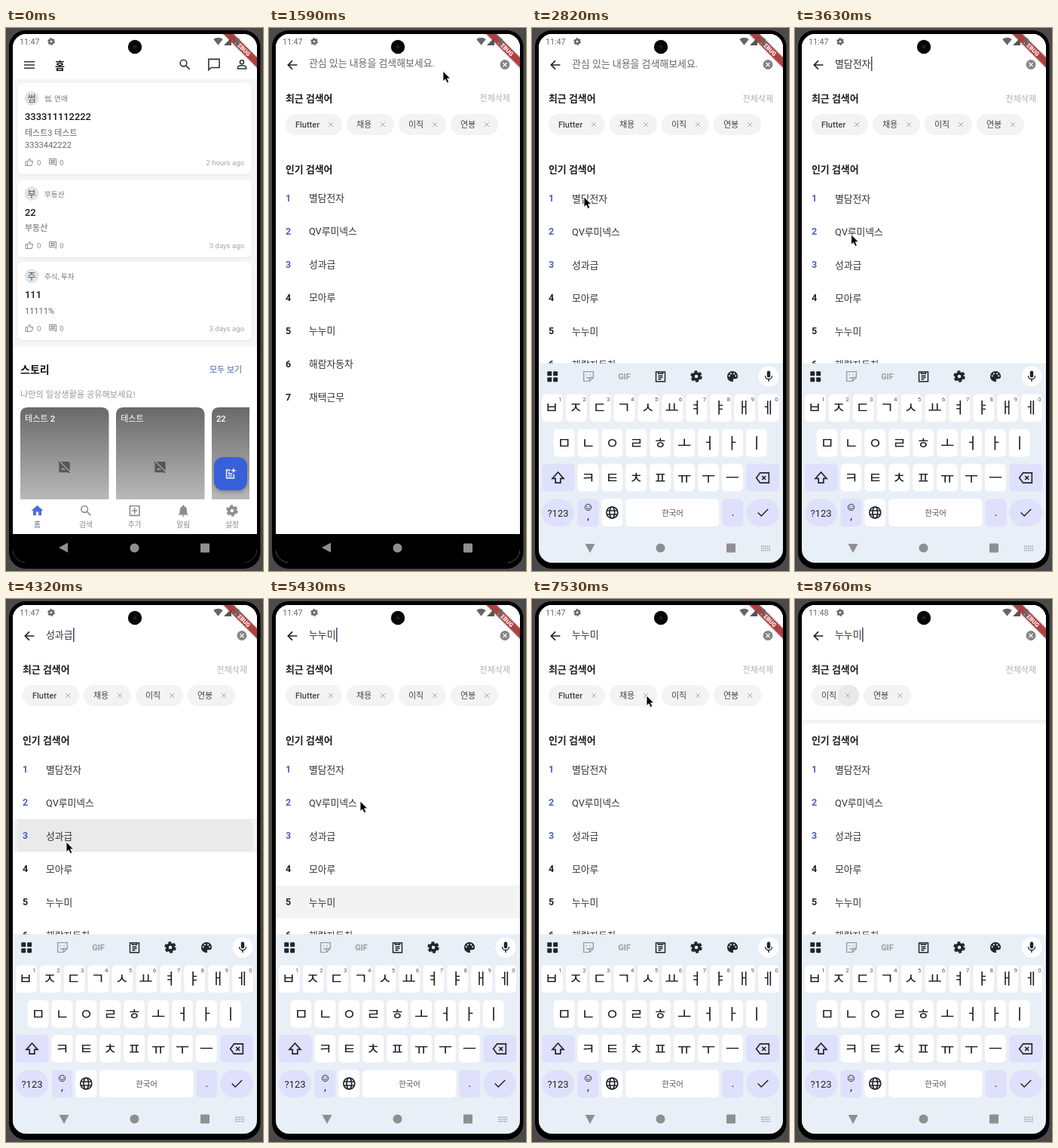
Write an HTML page that moves like this. It is 341 px wide and 720 px high and loops after 9.21 s.

```html
<!DOCTYPE html>
<html lang="ko">
<head>
<meta charset="utf-8">
<title>Search demo</title>
<style>
html, body { margin: 0; width: 100%; height: 100%; overflow: hidden; background: #4a4a4a; }
svg { display: block; font-family: Roboto, "Noto Sans CJK KR", "Noto Sans CJK", sans-serif; }
text { white-space: pre; }
</style>
</head>
<body>
<svg id="stage" width="341" height="720" viewBox="0 0 341 720"></svg>
<script>
const LOOP = 9210;
const $ = id => document.getElementById(id);
const clamp = v => Math.max(0, Math.min(1, v));
const smooth = p => p * p * (3 - 2 * p);

// Icons on a 24 unit grid: filled shapes and outlines.
const path = d => `<path d="${d}"/>`;
const FILLED = {
  home: path('M10 20v-6h4v6h5v-8h3L12 3 2 12h3v8z'),
  bell: path('M12 22a2 2 0 0 0 2-2h-4a2 2 0 0 0 2 2zm6-6v-5c0-3-1.6-5.6-4.5-6.3V4a1.5 1.5 0 0 0-3 0v.7C7.6 5.4 6 8 6 11v5l-2 2v1h16v-1z'),
  mic: path('M12 14a3 3 0 0 0 3-3V5a3 3 0 0 0-6 0v6a3 3 0 0 0 3 3zm5-3a5 5 0 0 1-10 0H5c0 3.4 2.7 6.2 6 6.7V21h2v-3.3c3.3-.5 6-3.3 6-6.7z'),
  palette: path('M12 2a10 10 0 0 0 0 20c1.7 0 2-1.6 1.3-2.7-.8-1.3 0-2.6 1.5-2.6H17a5 5 0 0 0 5-5C22 6 17.5 2 12 2z') +
    [[6, 11], [9, 7], [15, 7], [18, 11]].map(([x, y]) => `<circle cx="${x}" cy="${y}" r="1.6" fill="#e9eff6"/>`).join(''),
  grid: [3, 13.5].map(x => [3, 13.5].map(y => `<rect x="${x}" y="${y}" width="8" height="8" rx="1.5"/>`).join('')).join(''),
  noImage: '<path fill-rule="evenodd" d="M21 5a2 2 0 0 0-2-2H5.8L21 18.2zM2.8 2.8L1.4 4.2 3 5.8V19a2 2 0 0 0 2 2h13.2l1.6 1.6 1.4-1.4zM6 17l3-4 2 2.7.8-1.1 2.4 2.4z"/>',
  wifi: path('M12 21L0 6a19 19 0 0 1 24 0z'),
  signal: path('M2 22h20V2z'),
  battery: path('M7 4h3V2h4v2h3v18H7z'),
  clear: '<circle cx="12" cy="12" r="10"/><path d="M8 8l8 8M16 8l-8 8" stroke="#fff" stroke-width="2"/>'
};
const OUTLINED = {
  menu: path('M2 6h20M2 12h20M2 18h20'),
  search: '<circle cx="9.5" cy="9.5" r="5.5"/>' + path('M14 14l6 6'),
  chat: path('M3 3h18v14H7l-4 4z'),
  person: '<circle cx="12" cy="8" r="3.2"/>' + path('M5 19v-2c0-4.500 14-4.500 14 0v2z'),
  thumb: path('M7 10v11H2V10zl6-8 1.5 1.5L13 9h8v3l-3 9H7'),
  comment: path('M3 3h18v18l-4-4H3zM6 7h12M6 10h12M6 13h12'),
  postAdd: path('M12 5H5v15h14v-7M8 12h8M8 16h8M8 9h3M18 2v8M14 6h8'),
  addBox: path('M4 4h16v16H4zM12 7v10M7 12h10'),
  gear: '<circle cx="12" cy="12" r="5.2" stroke-width="4.600"/><circle cx="12" cy="12" r="8.2" stroke-width="3.200" stroke-dasharray="4.900 3.688"/>',
  back: path('M21 12H4M12 4l-8 8 8 8'),
  close: path('M5 5l14 14M19 5L5 19'),
  sticker: path('M3 3h18v11l-7 7H3zM14 21v-7h7M8 8v2M15 8v2M8 14q3 2 5 0'),
  clipboard: path('M4 4h16v17H4zM8 4h8v3H8zM8 11h8M8 14h8M8 17h5'),
  shift: path('M12 3L3 13h5v7h8v-7h5z'),
  erase: path('M8 4h14v16H8l-6-8zM11 9l6 6M17 9l-6 6'),
  globe: '<circle cx="12" cy="12" r="9"/><ellipse cx="12" cy="12" rx="4" ry="9"/>' + path('M3.5 9h17M3.5 15h17'),
  smile: '<circle cx="12" cy="12" r="9"/>' + path('M8 8v3M16 8v3M7 14q5 5 10 0'),
  check: path('M3 12l6 6L21 6'),
  keys: '<path d="M1 7h22M1 12h22M1 17h22" stroke-width="3" stroke-dasharray="3 1.75"/>'
};
function icon(name, cx, cy, size, color, weight = 2) {
  const paint = FILLED[name] ? `fill="${color}"` : `fill="none" stroke="${color}" stroke-width="${weight}"`;
  return `<g transform="translate(${cx - size / 2} ${cy - size / 2}) scale(${size / 24})" ${paint}>${FILLED[name] || OUTLINED[name]}</g>`;
}
const text = (x, y, str, size, color, weight = 400, anchor = 'start', extra = '') =>
  `<text x="${x}" y="${y}" font-size="${size}" fill="${color}" font-weight="${weight}" text-anchor="${anchor}" ${extra}>${str}</text>`;
const rect = (x, y, w, h, fill, rx = 0, extra = '') =>
  `<rect x="${x}" y="${y}" width="${w}" height="${h}" rx="${rx}" fill="${fill}" ${extra}/>`;
const disc = (x, y, r, fill) => `<circle cx="${x}" cy="${y}" r="${r}" fill="${fill}"/>`;

// Home page
function card(y, h, avatarY, mark, topic, title, lines, age) {
  const foot = y + h - 16;
  return rect(15, y, 311, h, '#fff', 8, 'filter="url(#soft)"') +
    disc(34, avatarY, 9.5, '#e0e5ea') + text(34, avatarY + 5, mark, 12.5, '#4e5660', 400, 'middle') +
    text(51, avatarY + 4, topic, 9.6, '#777') +
    text(25, avatarY + 29, title, 12.9, '#161616', 500) +
    lines.map((s, i) => text(25, avatarY + 49.5 + i * 16, s, 11, '#666')).join('') +
    icon('thumb', 31, foot, 12, '#8a8a8a') + text(41, foot + 4, '0', 9.6, '#8a8a8a') +
    icon('comment', 62, foot, 12, '#8a8a8a') + text(71, foot + 4, '0', 9.6, '#8a8a8a') +
    text(316, foot + 4, age, 9.6, '#a4a4a4', 400, 'end');
}
function story(x, title, cut) {
  const edge = cut ? 'h40' : 'h97.5q10 0 10 10';
  return `<path d="M${x} 625V513q0-10 10-10${edge}V625z" fill="url(#shade)"/>` +
    text(x + 6, 521.5, title, 11.2, '#fff', 500) + (cut ? '' : icon('noImage', x + 58.5, 582, 19, '#555'));
}
const tabs = [['home', '홈'], ['search', '검색'], ['addBox', '추가'], ['bell', '알림'], ['gear', '설정']];
const home = rect(9, 8, 324, 663, '#fff') + rect(9, 68, 324, 354, '#f5f5f5') +
  icon('menu', 31, 49, 17, '#333', 2.2) + text(65, 54.5, '홈', 14, '#111', 700) +
  icon('search', 237.5, 48.5, 19, '#333') + icon('chat', 276, 48.5, 19, '#333') + icon('person', 313, 48.5, 19, '#333') +
  card(73, 121, 93, '썸', '썸, 연애', '333311112222', ['테스트3 테스트', '3333442222'], '2 hours ago') +
  card(201, 103, 219.5, '부', '부동산', '22', ['부동산'], '3 days ago') +
  card(310, 104, 329, '주', '주식, 투자', '111', ['11111%'], '3 days ago') +
  text(19, 458, '스토리', 14, '#161616', 700) + text(270, 456.5, '모두 보기', 11, '#4562ac') +
  text(19, 489.5, '나만의 일상생활을 공유해보세요!', 11.2, '#999') +
  story(19, '테스트 2') + story(146, '테스트') + story(273, '22', true) +
  rect(276, 569, 44, 44, '#3960d8', 12, 'filter="url(#lift)"') + icon('postAdd', 297.5, 591, 17, '#fff') +
  rect(9, 625, 324, 46, '#fff') +
  tabs.map(([name, label], i) => {
    const x = 41.5 + i * 64.6;
    return icon(name, x, 640, 19, i ? '#8c8c8c' : '#5069e0') + text(x, 662, label, 9.8, i ? '#8c8c8c' : '#5d6680', 400, 'middle');
  }).join('');

// Search page
const topics = ['별담전자', 'QV루미넥스', '성과급', '모아루', '누누미', '해람자동차', '재택근무'];
const rowY = i => 225.5 + i * 44;
const search = rect(9, 8, 324, 701, '#fff') +
  icon('back', 31, 49, 17, '#222', 2.4) + icon('clear', 313, 48.5, 15.5, '#858585') +
  text(53, 51.5, '', 12.9, '#333', 400, 'start', 'id="field"') + rect(53, 38, 1.5, 19, '#3d4675', 0, 'id="caret"') +
  text(22, 98, '최근 검색어', 12.9, '#1c1c1c', 700) + text(320, 97.5, '전체삭제', 11, '#b0b0b0', 400, 'end') +
  '<g id="chips"></g>' + rect(9, 160, 324, 5, '#f3f3f3', 0, 'id="divider"') +
  text(22, 192, '인기 검색어', 12.9, '#1c1c1c', 700) +
  '<g id="ink" clip-path="url(#row)"><rect id="glow" x="9" y="-22" width="324" height="44"/><circle id="splash"/></g>' +
  topics.map((s, i) => text(22, rowY(i) + 4.5, i + 1, 12.5, i < 3 ? '#4a62ba' : '#222', 700) +
    text(53, rowY(i) + 5, s, 12.8, '#333')).join('');

function chips(names, touched) {
  let x = 22;
  return names.map(name => {
    const w = name === 'Flutter' ? 75 : 63;
    const out = rect(x, 114, w, 28, '#f3f3f3', 14) +
      (touched && x === 22 ? rect(x + w - 28, 114, 28, 28, '#e9e9e9', 14) : '') +
      text(x + 13, 132, name, 11, '#444', 500) + icon('close', x + w - 15, 128, 10.5, '#a0a0a0');
    x += w + 6;
    return out;
  }).join('');
}

// Keyboard
const TINT = '#dfe0fb', INK = '#22252b';
const key = (x, y, w, fill = '#fff', rx = 5) => rect(x, y, w, 36.5, fill, rx);
const letters = (str, x0, y, hints = '') => [...str].map((c, i) => {
  const x = x0 + i * 31.9;
  return key(x, y, 27.8) + text(x + 14 - (hints ? 1 : 0), y + 25.5, c, 20, '#1d1f24', 400, 'middle') +
    (hints ? text(x + 24.5, y + 9.5, hints[i], 8, '#555', 400, 'middle') : '');
}).join('');
const keyboard = rect(9, 444.5, 324, 275, '#e9eff6') +
  icon('grid', 27, 462, 18, INK) + icon('sticker', 75, 462, 17, '#9a9fa6') +
  text(122.5, 466, 'GIF', 11, '#9a9fa6', 700, 'middle') + icon('clipboard', 170.5, 462, 18, INK) +
  icon('gear', 218, 462, 19, INK) + icon('palette', 266, 462, 17, INK) +
  disc(314, 462, 13.5, '#fff') + icon('mic', 314, 462, 18, INK) +
  letters('ㅂㅈㄷㄱㅅㅛㅕㅑㅐㅔ', 13, 485.5, '1234567890') + letters('ㅁㄴㅇㄹㅎㅗㅓㅏㅣ', 28.7, 532) + letters('ㅋㅌㅊㅍㅠㅜㅡ', 60.5, 578) +
  key(13, 578, 43.5, TINT) + icon('shift', 34.5, 596.5, 20, INK) +
  key(284.5, 578, 43.5, TINT) + icon('erase', 306, 596.5, 20, INK) +
  key(13, 624.5, 43, TINT, 18) + text(34.5, 647.5, '?123', 13, INK, 400, 'middle') +
  key(60.5, 624.5, 27.8, TINT) + icon('smile', 74.5, 635.5, 11, INK) + text(74.5, 652, ',', 15, INK, 400, 'middle') +
  key(92.4, 624.5, 27.8) + icon('globe', 106.3, 642.5, 20, INK) +
  key(124.3, 624.5, 124) + text(186.5, 646.5, '한국어', 10.4, '#555', 400, 'middle') +
  key(252.5, 624.5, 27.8, TINT) + text(266.5, 647, '.', 15, INK, 400, 'middle') +
  key(284.5, 624.5, 43.5, TINT, 18) + icon('check', 306.5, 642.5, 18, INK);

const systemNav = '<path id="backKey" d="M-7 0L5-6.5V6.5z" fill="#8f8f93"/>' + disc(170.5, 689.5, 6, '#8f8f93') +
  rect(258, 683.5, 12, 12, '#8f8f93', 1) + `<g id="keysIcon">${icon('keys', 310, 690, 13, '#a2a5aa')}</g>`;
const status = text(18, 22, '', 10.7, '#666', 400, 'start', 'id="clock"') + icon('gear', 60, 18, 12, '#666') +
  icon('wifi', 281.5, 18, 12.5, '#666') + icon('signal', 294, 18, 12, '#555') + icon('battery', 307, 18, 12, '#666');
const banner = '<g transform="translate(333 8) rotate(45)">' + rect(-40, 22, 80, 9.5, '#000', 0, 'opacity="0.4" filter="url(#blur)"') +
  rect(-40, 22, 80, 9.5, '#b71c1c', 0, 'opacity="0.7"') + text(0, 29.6, 'DEBUG', 7.8, '#fff', 900, 'middle') + '</g>';

$('stage').innerHTML = `<defs>
  <clipPath id="screen"><rect x="9" y="8" width="324" height="701" rx="18"/></clipPath>
  <clipPath id="row"><rect x="9" y="-22" width="324" height="44"/></clipPath>
  <linearGradient id="shade" x2="0" y2="1"><stop stop-color="#696969"/><stop offset="1" stop-color="#b9b9b9"/></linearGradient>
  <filter id="soft"><feDropShadow dx="0" dy="0.8" stdDeviation="0.8" flood-opacity="0.07"/></filter>
  <filter id="blur" y="-100%" height="300%"><feGaussianBlur stdDeviation="1.2"/></filter>
  <filter id="lift" x="-50%" y="-50%" width="200%" height="200%"><feDropShadow dx="0" dy="2.5" stdDeviation="2.5" flood-opacity="0.25"/></filter>
</defs>` + rect(0, 0, 341, 720, '#4a4a4a') + rect(4, 3, 333.5, 714, '#000', 22) +
  `<g clip-path="url(#screen)">${rect(9, 8, 324, 701, '#fff')}
  <g id="home">${home}</g><g id="search">${search}</g>${rect(9, 671, 324, 38, '#000')}
  <g id="keyboard">${keyboard}</g>${systemNav}${banner}${status}</g>` +
  disc(171, 25, 9.2, '#060606') + disc(171, 25, 2.5, '#1b1f1b') +
  '<path id="cursor" d="M0 0v13.5l3-2.7 2.2 4.8 2.6-1.2-2.2-4.6h4.2z" fill="#000" stroke="#fff" stroke-width="0.9"/>';

// Timeline: pointer stops are [ms, x, y], taps are [ms, row, x].
const route = [[450, 345, 330], [690, 334, 290], [870, 334, 290], [1270, 237, 48], [1450, 237, 48], [1810, 219, 75], [1850, 219, 75],
  [2780, 69, 224], [3150, 69, 224], [4100, 80, 322], [4380, 80, 322], [5130, 72, 402], [5270, 72, 402], [5430, 121, 268], [5950, 228, 190],
  [6500, 268, 152], [7000, 208, 146], [7450, 152, 128], [7700, 152, 128], [8100, 82, 128], [8310, 82, 128], [8730, 346, 190]];
const taps = [[3020, 0, 69], [4200, 2, 80], [5230, 4, 72]];
const FOCUS = 1824, KEYS_UP = 1763, OPEN = 1390;

function movePointer(t) {
  const next = route.findIndex(stop => stop[0] > t);
  $('cursor').style.display = next > 0 ? '' : 'none';
  if (next < 1) return;
  const [t0, x0, y0] = route[next - 1], [t1, x1, y1] = route[next];
  const p = smooth((t - t0) / (t1 - t0));
  $('cursor').setAttribute('transform', `translate(${x0 + (x1 - x0) * p} ${y0 + (y1 - y0) * p})`);
}
function openSearch(t) {
  const p = 1 - (1 - clamp((t - OPEN) / 210)) ** 3;
  const zoom = k => `translate(${171 * (1 - k)} ${358 * (1 - k)}) scale(${k})`;
  $('home').setAttribute('transform', zoom(1 + 0.05 * p));
  $('search').setAttribute('transform', zoom(0.88 + 0.12 * p));
  $('search').setAttribute('opacity', clamp(p * 1.8));
}
function raiseKeyboard(t) {
  const p = clamp((t - KEYS_UP) / 180);
  $('keyboard').setAttribute('transform', `translate(0 ${265 * (1 - p) ** 3})`);
  $('backKey').setAttribute('transform', `translate(77 689) rotate(${-90 * p ** 0.8})`);
  $('keysIcon').style.display = p ? '' : 'none';
}
function fillField(t, tap) {
  const field = $('field');
  field.textContent = tap ? topics[tap[1]] : '관심 있는 내용을 검색해보세요.';
  field.setAttribute('fill', tap ? '#333' : '#666');
  $('caret').setAttribute('x', tap ? 53.5 + field.getComputedTextLength() : 53);
  const since = t - (tap ? tap[0] : FOCUS);
  $('caret').style.display = since >= 0 && since % 500 < 250 ? '' : 'none';
}
function inkRow(t, tap) {
  const d = tap ? t - tap[0] : LOOP;
  $('ink').style.display = d < 330 ? '' : 'none';
  if (d >= 330) return;
  $('ink').setAttribute('transform', `translate(0 ${rowY(tap[1])})`);
  $('glow').setAttribute('opacity', 0.047 * clamp(d / 60) * clamp((330 - d) / 130));
  $('splash').setAttribute('cx', tap[2] + (171 - tap[2]) * clamp(d / 120));
  $('splash').setAttribute('r', 20 + 136 * d / 120);
  $('splash').setAttribute('opacity', 0.035 * clamp((200 - d) / 70));
}
let chipState = -1;
function updateChips(t) {
  const state = (t >= 7620) + (t >= 8250);
  if (state === chipState) return;
  chipState = state;
  const names = [['Flutter', '채용', '이직', '연봉'], ['Flutter', '이직', '연봉'], ['이직', '연봉']][state];
  $('chips').innerHTML = chips(names, state === 2);
}
function draw(now) {
  const t = now % LOOP;
  const tap = taps.filter(([at]) => at <= t).pop();
  $('clock').textContent = t < 7800 ? '11:47' : '11:48';
  $('divider').style.display = t < 8750 ? 'none' : '';
  movePointer(t);
  openSearch(t);
  raiseKeyboard(t);
  fillField(t, tap);
  inkRow(t, tap);
  updateChips(t);
}
const start = performance.now();
function tick() {
  draw(performance.now() - start);
  requestAnimationFrame(tick);
}
tick();
</script>
</body>
</html>
```
